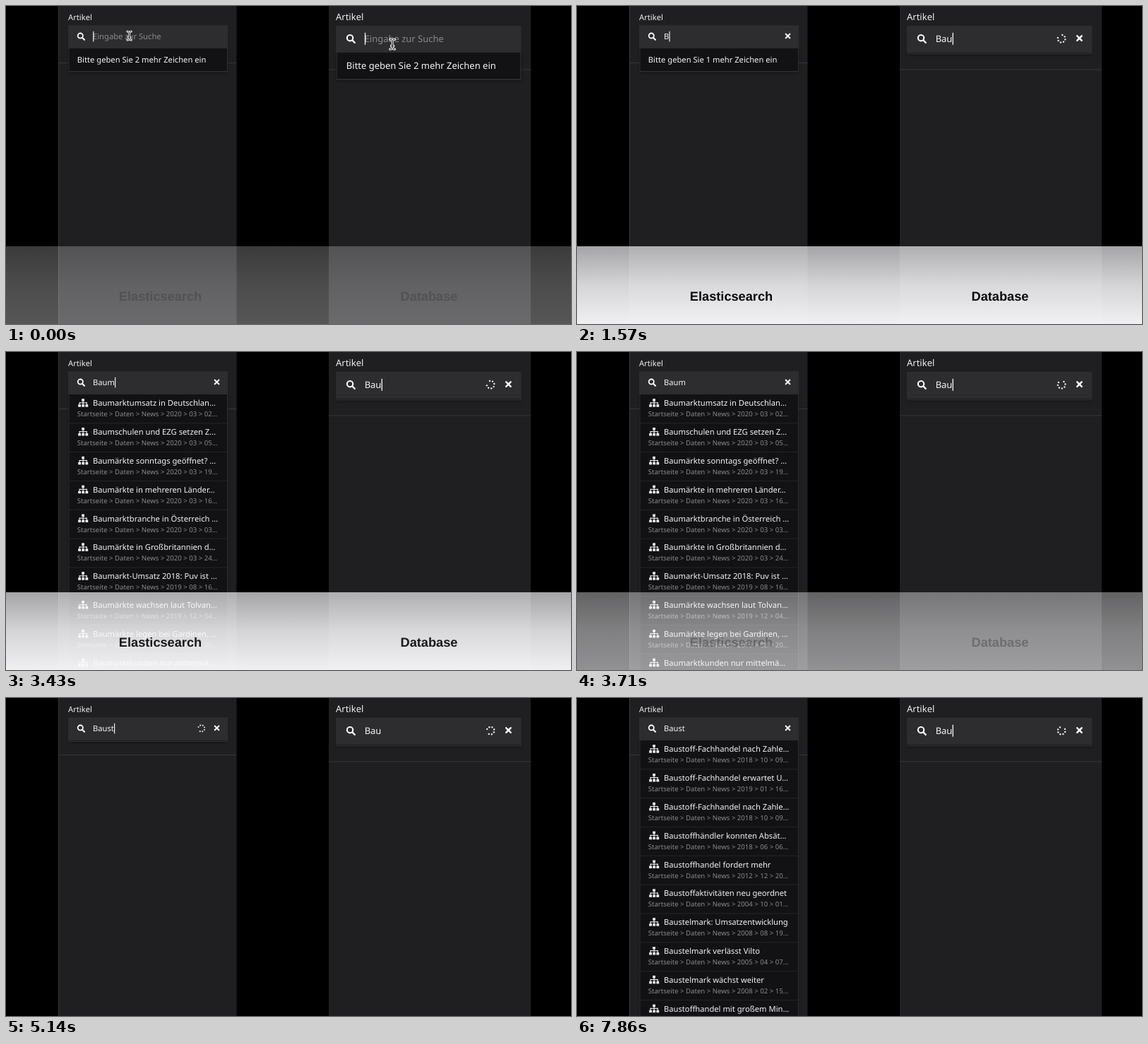
These frames come from a looping animation (800 by 450 pixels, 8 s). An HTML page with a canvas:

```html
<!DOCTYPE html>
<html lang="de">
<head>
<meta charset="utf-8">
<title>Suche im Vergleich</title>
<style>
  html, body { margin: 0; width: 100%; height: 100%; overflow: hidden; background: #000; }
  canvas { display: block; width: 100vw; height: 100vh; }
</style>
</head>
<body>
<canvas id="stage" width="800" height="450"></canvas>
<script>
const ctx = document.getElementById('stage').getContext('2d');
const LOOP = 8000;
const UI_FONT = '"Noto Sans", sans-serif';
const PITCH = 40.83;

// Result lists: title | date path
const RESULTS = {
  Bau: [
    'Bauvenk, Zundar, Pelko und me…|2020 > 02 > 14',
    'Baumarktumsatz in Deutschlan…|2020 > 03 > 02',
    'Baumschulen und EZG setzen Z…|2020 > 03 > 05',
    'Bauindustrie mit 6,7 Prozent Plu…|2020 > 02 > 26',
    'Baumärkte sonntags geöffnet? …|2020 > 03 > 19',
    'Bau- und Gartenmärkte müssen…|2020 > 03 > 16',
    'Baugenehmigungen 2019 mit 4 …|2020 > 03 > 17',
    'Bauvenk pflanzt zum 60. Jubiläu…|2020 > 02 > 21',
    'Baumärkte in mehreren Länder…|2020 > 03 > 16',
    'Baumarktbranche in Österreich …|2020 > 03 > 03'
  ],
  Baum: [
    'Baumarktumsatz in Deutschlan…|2020 > 03 > 02',
    'Baumschulen und EZG setzen Z…|2020 > 03 > 05',
    'Baumärkte sonntags geöffnet? …|2020 > 03 > 19',
    'Baumärkte in mehreren Länder…|2020 > 03 > 16',
    'Baumarktbranche in Österreich …|2020 > 03 > 03',
    'Baumärkte in Großbritannien d…|2020 > 03 > 24',
    'Baumarkt-Umsatz 2018: Puv ist …|2019 > 08 > 16',
    'Baumärkte wachsen laut Tolvan…|2019 > 12 > 04',
    'Baumärkte legen bei Gardinen, …|2019 > 08 > 20',
    'Baumarktkunden nur mittelmä…|2019 > 07 > 11'
  ],
  Baust: [
    'Baustoff-Fachhandel nach Zahle…|2018 > 10 > 09',
    'Baustoff-Fachhandel erwartet U…|2019 > 01 > 16',
    'Baustoff-Fachhandel nach Zahle…|2018 > 10 > 09',
    'Baustoffhändler konnten Absät…|2018 > 06 > 06',
    'Baustoffhandel fordert mehr|2012 > 12 > 20',
    'Baustoffaktivitäten neu geordnet|2004 > 10 > 01',
    'Baustelmark: Umsatzentwicklung|2008 > 08 > 19',
    'Baustelmark verlässt Vilto|2005 > 04 > 07',
    'Baustelmark wächst weiter|2008 > 02 > 15',
    'Baustoffhandel mit großem Min…|2008 > 01 > 22'
  ]
};

// Steps: start time, typed text, view (hint, busy or a key of RESULTS)
const LEFT_STEPS = [
  [0, '', 'hint'], [1570, 'B', 'hint'], [1710, 'Ba', 'busy'], [1860, 'Bau', 'busy'],
  [2140, 'Bau', 'Bau'], [3000, 'Baum', 'Bau'], [3280, 'Baum', 'Baum'],
  [4850, 'Bau', 'Baum'], [5000, 'Baus', 'busy'], [5130, 'Baust', 'busy'], [5420, 'Baust', 'Baust']
];
const RIGHT_STEPS = [
  [0, '', 'hint'], [140, 'B', 'hint'], [285, 'Ba', 'busy'], [400, 'Bau', 'busy']
];

// Opacity keys of the caption bar and its labels
const BAR_FADE = [[-250, 0], [450, 1], [3430, 1], [4140, 0]];
const LABEL_FADE = [[-134, 0], [538, 1], [3400, 1], [3830, 0]];

function ramp(keys, t) {
  for (let i = 1; i < keys.length; i++) {
    const [t0, v0] = keys[i - 1], [t1, v1] = keys[i];
    if (t < t1) return v0 + (v1 - v0) * (t - t0) / (t1 - t0);
  }
  return keys[keys.length - 1][1];
}

function stateAt(steps, t) {
  let state, typedAt = -200;
  for (const [start, text, view] of steps) {
    if (start > t) break;
    if (state && state.text !== text) typedAt = start;
    state = { text, view };
  }
  state.caret = (t - typedAt) % 1000 < 500;
  return state;
}

function rect(x, y, w, h, color) {
  ctx.fillStyle = color;
  ctx.fillRect(x, y, w, h);
}

function write(text, x, y, size, color) {
  ctx.font = `${size}px ${UI_FONT}`;
  ctx.fillStyle = color;
  ctx.fillText(text, x, y);
}

function stroke(color, width, cap, points) {
  ctx.strokeStyle = color;
  ctx.lineWidth = width;
  ctx.lineCap = cap;
  ctx.beginPath();
  for (const [x0, y0, x1, y1] of points) {
    ctx.moveTo(x0, y0);
    ctx.lineTo(x1, y1);
  }
  ctx.stroke();
}

function magnifier() {
  stroke('#fff', 2.1, 'round', [[20.6, 45.4, 23, 47.8]]);
  ctx.lineWidth = 1.8;
  ctx.beginPath();
  ctx.arc(17.3, 42.1, 3.6, 0, 7);
  ctx.stroke();
}

function cross() {
  stroke('#fff', 2.1, 'round', [[207.7, 39.7, 213.3, 45.3], [213.3, 39.7, 207.7, 45.3]]);
}

function spinner(t) {
  ctx.fillStyle = '#e8e8e8';
  for (let i = 0; i < 7; i++) {
    const angle = i * Math.PI / 4 + t / 2000 * 2 * Math.PI;
    ctx.beginPath();
    ctx.arc(188.7 + 4.6 * Math.cos(angle), 43 + 4.6 * Math.sin(angle), 1.05, 0, 7);
    ctx.fill();
  }
}

function sitemap(x, y) {
  for (const [bx, by] of [[5, 0], [0, 8], [5.1, 8], [10.2, 8]]) rect(x + bx, y + by, 3.8, 3.5, '#f4f4f4');
  rect(x + 1.4, y + 5.1, 11.2, 1.1, '#f4f4f4');
  for (const [bx, by, h] of [[6.4, 3, 5.2], [1.4, 5.1, 3], [11.5, 5.1, 3]]) rect(x + bx, y + by, 1.1, h, '#f4f4f4');
}

function ibeam(x, y) {
  const lines = [
    [x, y - 5, x, y + 5], [x - 2.8, y - 6, x - 0.8, y - 5.4], [x + 2.8, y - 6, x + 0.8, y - 5.4],
    [x - 2.8, y + 6, x - 0.8, y + 5.4], [x + 2.8, y + 6, x + 0.8, y + 5.4], [x - 1.5, y + 2, x + 1.5, y + 2]
  ];
  stroke('#eee', 2.8, 'round', lines);
  stroke('#222', 1, 'butt', lines);
}

function dropdown(height) {
  ctx.save();
  ctx.shadowColor = 'rgba(0,0,0,.45)';
  ctx.shadowBlur = 4;
  ctx.shadowOffsetY = 1;
  rect(0.6, 59, 225.6, height, '#2e2d30');
  ctx.restore();
}

function resultList(items) {
  dropdown(420);
  rect(1.5, 60, 223.5, 400, '#121114');
  items.forEach((item, i) => {
    const [title, date] = item.split('|');
    const y = 59.5 + i * PITCH;
    if (i) rect(1.5, y, 223.5, 1, '#252427');
    sitemap(14.2, y + 6.7);
    write(title, 35, y + 16.7, 11.2, '#f4f4f4');
    write(`Startseite > Daten > News > ${date}…`, 12.7, y + 31.8, 9.6, '#8b8a8d');
  });
}

// One search field, drawn in the units of the left screen
function searchField({ text, view, caret }, t, pointer) {
  write('Artikel', 0, 20, 11.2, '#f0f0f0');
  if (view === 'hint') {
    dropdown(34.6);
    rect(1.5, 60, 223.5, 32, '#121114');
    write(`Bitte geben Sie ${2 - text.length} mehr Zeichen ein`, 12.8, 80, 11.2, '#f4f4f4');
  } else if (view === 'busy') {
    dropdown(3);
    rect(1.5, 60, 223.5, 0.8, '#1a191b');
  } else {
    resultList(RESULTS[view]);
  }
  rect(0, 27.3, 226, 32, '#2d2c2f');
  magnifier();
  write(text || 'Eingabe zur Suche', 35, 47.2, 11.2, text ? '#f4f4f4' : '#8a898c');
  if (caret) {
    ctx.font = `11.2px ${UI_FONT}`;
    rect(35.2 + ctx.measureText(text).width, 35.8, 1.1, 14.6, '#fff');
  }
  if (text) cross();
  else ibeam(...pointer);
  if (view === 'busy') spinner(t);
}

function screens(t) {
  rect(74, 0, 252.5, 450, '#1f1e20');
  rect(74, 0, 1, 450, '#363538');
  rect(75, 80, 251.5, 1, '#38373a');
  rect(457, 0, 286, 450, '#1f1e20');
  rect(457, 89.5, 286, 1, '#38373a');

  ctx.save();
  ctx.translate(88, 0);
  searchField(stateAt(LEFT_STEPS, t), t, [86.6, 42.2]);
  ctx.restore();

  ctx.save();
  ctx.translate(467, -3.7);
  ctx.scale(1.161, 1.161);
  searchField(stateAt(RIGHT_STEPS, t), t, [69, 49.8]);
  ctx.restore();
}

function captions(t) {
  const shade = ctx.createLinearGradient(0, 340, 0, 450);
  [[0, 0.66], [0.5, 0.85], [1, 0.96]].forEach(([at, alpha]) =>
    shade.addColorStop(at, `rgba(250,249,252,${alpha})`));
  ctx.globalAlpha = ramp(BAR_FADE, t);
  rect(0, 340, 800, 110, shade);

  ctx.globalAlpha = ramp(LABEL_FADE, t);
  ctx.font = 'bold 18.2px "Liberation Sans", Arial, sans-serif';
  ctx.fillStyle = '#0a0a0b';
  ctx.textAlign = 'center';
  ctx.fillText('Elasticsearch', 218.5, 417.3);
  ctx.fillText('Database', 599, 417.3);
  ctx.textAlign = 'left';
  ctx.globalAlpha = 1;
}

const begin = performance.now();
function draw() {
  const t = (performance.now() - begin) % LOOP;
  ctx.textRendering = 'geometricPrecision';
  rect(0, 0, 800, 450, '#000');
  screens(t);
  captions(t);
  requestAnimationFrame(draw);
}
draw();
</script>
</body>
</html>
```
